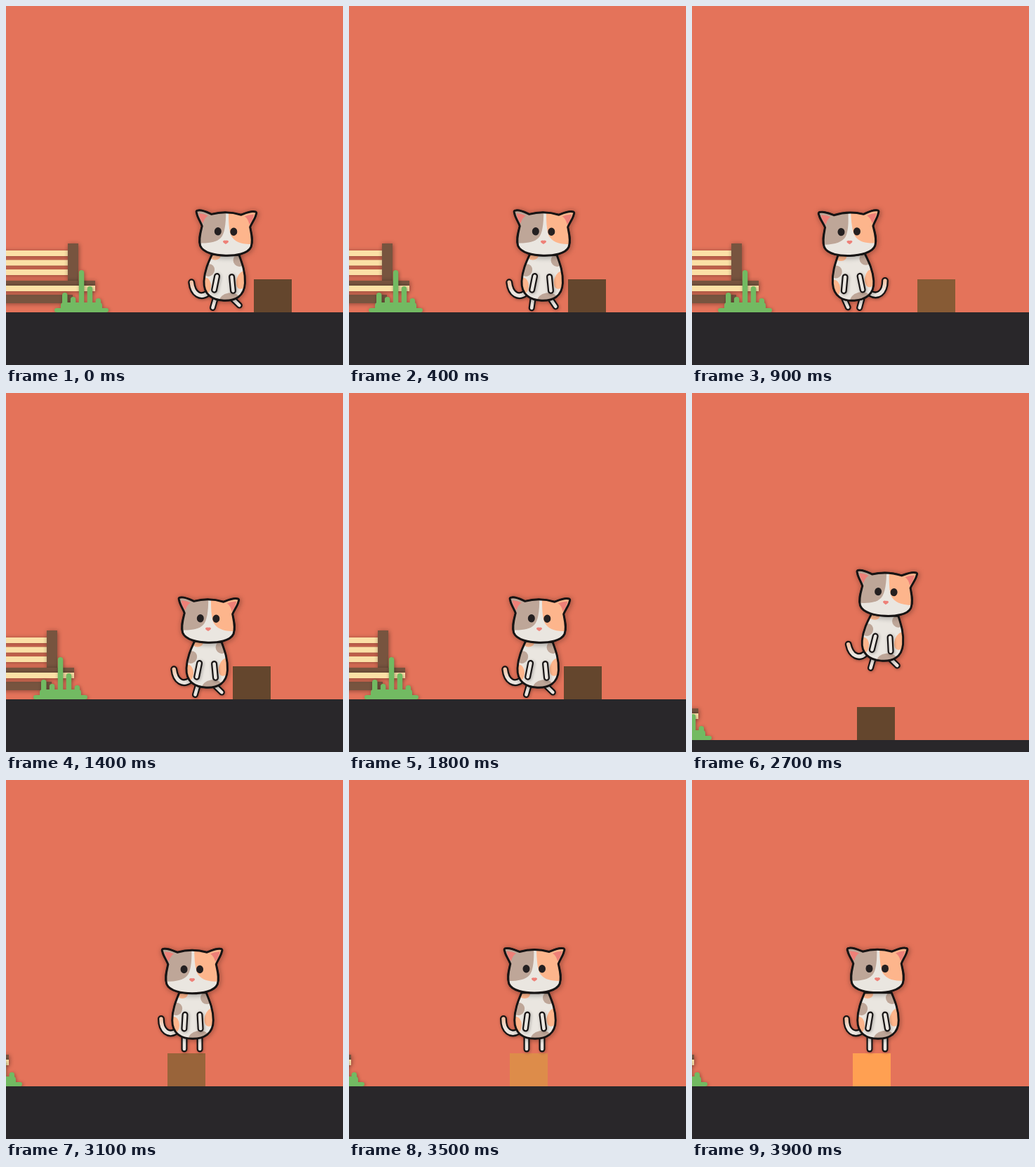
Recreate the animation shown at these times as an HTML page with a canvas. Size 480 px wide and 511 px high, loop 4000 ms.

```html
<!DOCTYPE html>
<html lang="en">
<head>
<meta charset="utf-8">
<title>Cat and crate</title>
<style>
html, body { margin: 0; width: 100%; height: 100%; overflow: hidden; background: #e4735a; }
canvas { display: block; width: 480px; height: 511px; }
</style>
</head>
<body>
<canvas id="stage" width="480" height="511"></canvas>
<script>
const ctx = document.getElementById('stage').getContext('2d');
const LOOP = 4000, STEP = 100, DT = 4;
const GROUND = 436, CRATE = 47, WALL = 316, GOAL = 389, CENTER = 265;
const SPEED = 260, JUMP = 673, GRAVITY = 1264, CLEARANCE = 66;
const TURN_LEFT = 692, TURN_RIGHT = 992, TAKE_OFF = 1800;
const INK = '#171414', WHITE = '#eae6e0', GREY = '#bea698', PEACH = '#fdb58c', PINK = '#ee8078';

const mix = (a, b, u) => a + (b - a) * u;
const clamp = u => Math.min(1, Math.max(0, u));
function ramp(t, from, to) {
  const u = clamp((t - from) / (to - from));
  return u * u * (3 - 2 * u);
}

// The cat walks into the crate, back, in again, then jumps on top; the camera trails it.
function simulate() {
  const poses = [], dt = DT / 1000;
  let x = 311, h = 0, vy = 0, cam = 0, tilt = 2.5, stride = 1, glow = 0;
  for (let t = 0; t < LOOP; t += DT) {
    if (t % STEP === 0) {
      const camY = 58 * (ramp(t, 1950, 2600) - ramp(t, 2720, 3020));
      const swing = t < TAKE_OFF ? Math.cos(2 * Math.PI * t / 350) : 1;
      poses.push({ x, h, cam, camY, tilt, stride, glow, swing, lift: 1.6 * glow * (1 - stride) });
    }
    const dir = t >= TURN_LEFT && t < TURN_RIGHT ? -1 : 1;
    const floor = x > WALL ? CRATE : 0;
    if (t === TAKE_OFF) vy = JUMP;
    h += vy * dt;
    vy -= GRAVITY * dt;
    if (h <= floor) { h = floor; vy = 0; }
    const air = h > floor, done = floor > 0 && !air;
    x = Math.min(floor || h > CLEARANCE ? GOAL : WALL, x + dir * SPEED * dt);
    cam += (x - CENTER - cam) * 4 * dt;
    tilt += ((done ? 0 : air ? 5 : dir < 0 ? -4 : 2.5) - tilt) * 15 * dt;
    stride += ((done ? 0 : 1) - stride) * 15 * dt;
    glow = clamp(glow + (done || dir < 0 ? 1.1 : -2) * dt);
  }
  return poses;
}

function at(x, y, deg, draw) {
  ctx.save();
  ctx.translate(x, y);
  ctx.rotate(deg * Math.PI / 180);
  draw();
  ctx.restore();
}

function shadow(blur, alpha) {
  ctx.shadowBlur = blur;
  ctx.shadowColor = `rgba(0,0,0,${alpha})`;
  ctx.shadowOffsetX = ctx.shadowOffsetY = blur ? 1 : 0;
}

function rect(color, x, y, w, h) {
  ctx.fillStyle = color;
  ctx.fillRect(x, y, w, h);
}

function fill(path, color) {
  ctx.fillStyle = color;
  ctx.fill(path);
}

function stroke(path, color, width) {
  ctx.strokeStyle = color;
  ctx.lineWidth = width;
  ctx.stroke(path);
}

function oval(color, x, y, rx, ry, deg = 0) {
  ctx.fillStyle = color;
  ctx.beginPath();
  ctx.ellipse(x, y, rx, ry, deg * Math.PI / 180, 0, 7);
  ctx.fill();
}

function mirrored(draw) {
  ctx.save();
  ctx.scale(-1, 1);
  draw();
  ctx.restore();
}

const HEAD = new Path2D('M-40-31C-34-32-26-28-21-26Q0-32 21-26C26-28 34-32 40-31Q44-31 42-27C41-21 36-15 34-9'
  + 'C36 0 39 10 36 19C32 29 14 32 0 32C-14 32-32 29-36 19C-39 10-36 0-34-9C-36-15-41-21-42-27Q-44-31-40-31Z');
const FACE_L = new Path2D('M-46-36H-1C0-18-1 0-7 7C-14 15-28 16-46 15Z');
const FACE_R = new Path2D('M46-36H3C3-18 4 0 9 6C16 15 28 16 46 15Z');
const EAR = new Path2D('M-38-27Q-40-28-39-25Q-37-17-33-13Q-31-21-26-24Q-32-27-38-27Z');
const NOSE = new Path2D('M-3 11Q-1 10 0 11Q1 10 3 11Q5 12 3 14L0 16L-3 14Q-5 12-3 11Z');
const BODY = new Path2D('M-19-84C-24-72-29-60-29-45C-29-26-16-19 0-19C16-19 29-26 29-45C29-60 24-72 19-84Z');
const TAIL = new Path2D('M0 0C-10 6-21 0-21-18');

function limb(x, y, deg, length) {
  at(x, y, deg, () => {
    const line = new Path2D(`M0 0V${length}`);
    shadow(4, 0.3);
    stroke(line, INK, 9);
    shadow(0, 0);
    stroke(line, WHITE, 4.6);
  });
}

function torso() {
  shadow(6, 0.45);
  stroke(BODY, INK, 3.4);
  shadow(0, 0);
  ctx.save();
  ctx.clip(BODY);
  rect(WHITE, -40, -100, 80, 90);
  oval(PEACH, -15, -82, 8, 6);
  oval(GREY, -23, -61, 8, 9, 20);
  oval(GREY, 20, -77, 9, 9);
  oval(PEACH, 25, -49, 8, 13, 15);
  oval(PEACH, -27, -38, 8, 12);
  oval(GREY, 8, -21, 14, 9, -12);
  ctx.restore();
  stroke(BODY, INK, 2.4);
}

function face() {
  shadow(7, 0.5);
  stroke(HEAD, INK, 3.4);
  shadow(0, 0);
  ctx.save();
  ctx.clip(HEAD);
  rect(WHITE, -46, -36, 92, 72);
  fill(FACE_L, GREY);
  fill(FACE_R, PEACH);
  ctx.restore();
  fill(EAR, PINK);
  mirrored(() => fill(EAR, PINK));
  stroke(HEAD, INK, 2.6);
  for (const x of [-11.5, 11]) oval('#242021', x, -2, 5, 5.7);
  fill(NOSE, PINK);
}

function tail(tilt) {
  at(-24, -29, -2.4 * Math.max(0, tilt), () => {
    shadow(4, 0.35);
    stroke(TAIL, INK, 10);
    shadow(0, 0);
    const tint = ctx.createLinearGradient(0, -18, 0, -4);
    tint.addColorStop(0, '#f3c4a8');
    tint.addColorStop(1, WHITE);
    stroke(TAIL, tint, 5.4);
  });
}

function cat({ tilt, stride, swing, lift }) {
  ctx.lineCap = ctx.lineJoin = 'round';
  if (tilt < 0) mirrored(() => tail(tilt));
  else tail(tilt);
  const leg = 17 - 4 * stride;
  limb(-12 - stride, -21, stride * (21 * swing - 5), leg);
  limb(10 + 2 * stride, -21, stride * (-14 - 32 * swing), leg);
  at(0, -40, tilt, () => {
    ctx.translate(0, 40);
    torso();
    limb(-11, -53, 9 * stride + 6 * lift, 20);
    limb(10, -53, -8 * stride - 6 * lift, 20);
    at(-1, -115 - lift, -tilt / 2, face);
  });
}

function bench() {
  const wood = '#77543f', cream = '#fbe0a6';
  shadow(6, 0.4);
  rect(wood, -20, 411, 115, 12);
  for (let i = 0; i < 3; i++) rect(cream, -20, 348 + 13.5 * i, 110, 8);
  rect(wood, 88, 338, 15, 54);
  rect(wood, -20, 391, 147, 7);
  rect(cream, -20, 398, 147, 8);
  shadow(0, 0);
}

function grass() {
  const p = new Path2D();
  p.roundRect(69, 430, 77, 6, 3);
  p.roundRect(78, 422, 59, 14, 4);
  [408, 414, 376, 399, 416].forEach((top, i) =>
    p.roundRect(80 + 11.9 * i, top, 7.5, GROUND - top, [3.7, 3.7, 0, 0]));
  shadow(5, 0.35);
  fill(p, '#72ba62');
  shadow(0, 0);
}

function crate(glow) {
  const from = [100, 70, 45], to = [255, 160, 82];
  rect(`rgb(${from.map((c, i) => Math.round(mix(c, to[i], glow)))})`, 353, GROUND - CRATE, 54, CRATE);
}

function render(pose) {
  rect('#e4735a', 0, 0, 480, 511);
  ctx.save();
  ctx.translate(-Math.round(pose.cam), Math.round(pose.camY));
  bench();
  grass();
  crate(pose.glow);
  rect('#29272a', -40, GROUND, 720, 140);
  at(pose.x, GROUND - 2 - pose.h + 4 * pose.stride, 0, () => cat(pose));
  ctx.restore();
}

const poses = simulate();
let start;
function tick(now) {
  start ??= now;
  render(poses[Math.floor((now - start) % LOOP / STEP)]);
  requestAnimationFrame(tick);
}
render(poses[0]);
requestAnimationFrame(tick);
</script>
</body>
</html>
```
